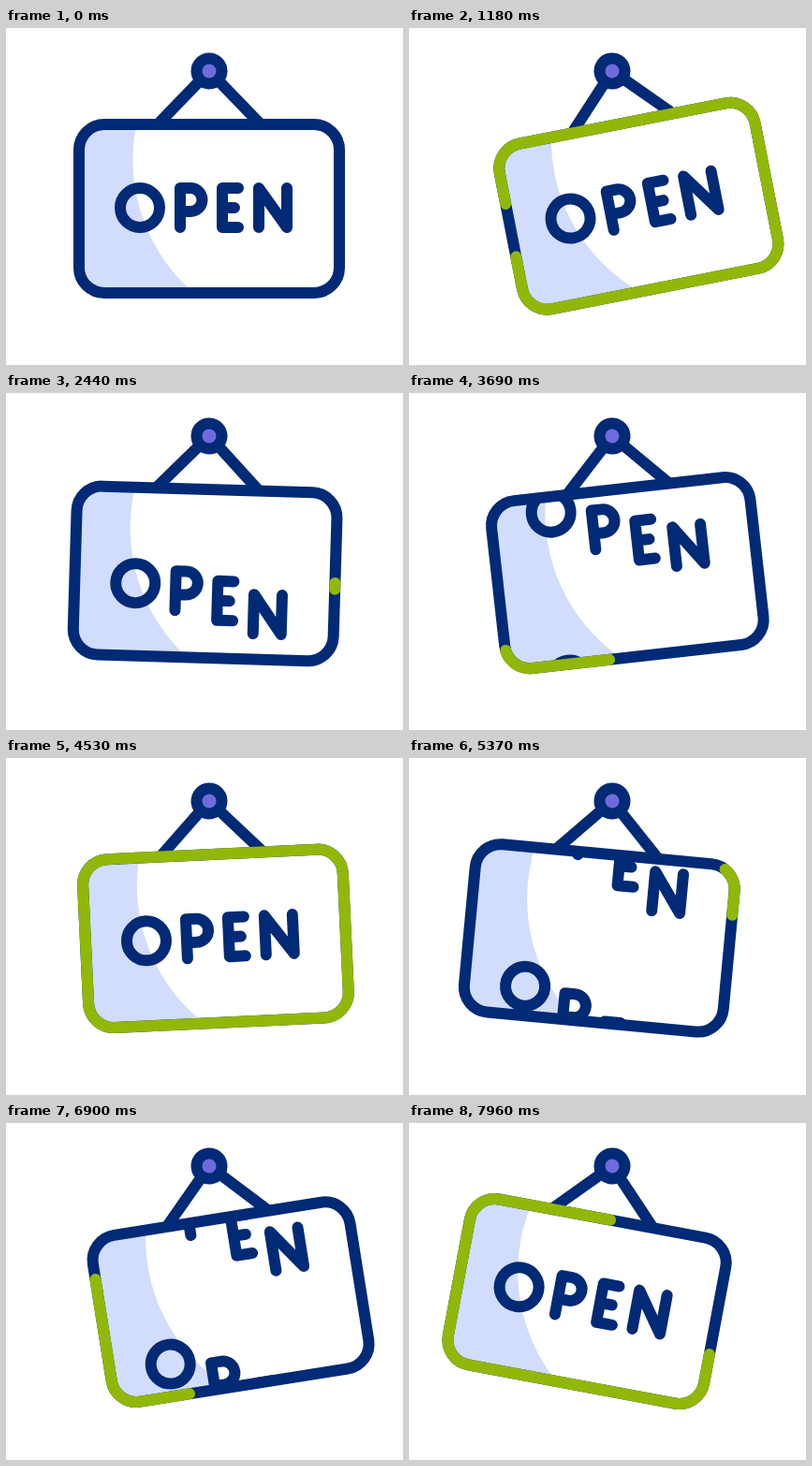
These frames come from a looping animation (424 px wide and 360 px high, 8 s). An HTML page:

```html
<!DOCTYPE html>
<html lang="en">
<head>
<meta charset="utf-8">
<title>Open sign</title>
<style>
  html, body { margin: 0; width: 100%; height: 100%; overflow: hidden; background: #fff; }
  svg { display: block; width: 424px; height: 360px; }
  .line { fill: none; stroke: #002a75; stroke-width: 12; stroke-linecap: round; stroke-linejoin: round; }
  #trace { stroke: #91b808; }
</style>
</head>
<body>
<svg viewBox="0 0 424 360" role="img" aria-label="OPEN">
  <defs>
    <path id="board" d="M356 193V256a27 27 0 0 1-27 27H105a27 27 0 0 1-27-27V130a27 27 0 0 1 27-27H329a27 27 0 0 1 27 27z"/>
    <clipPath id="inside"><use href="#board"/></clipPath>
  </defs>
  <g id="sign">
    <path class="line" d="M162 103L217 46L272 103"/>
    <g clip-path="url(#inside)">
      <use href="#board" fill="#d2dcfd"/>
      <circle cx="323" cy="141" r="187.5" fill="#fff"/>
      <g id="letters" class="line"></g>
    </g>
    <use href="#board" class="line"/>
    <path id="trace" class="line" pathLength="1"/>
    <circle class="line" cx="217" cy="46" r="13.5" style="fill:#6f6bdb"/>
  </g>
</svg>
<script>
const LOOP = 8000, CYCLE = 3130;
const FIRST_STEP = 130, STEP = 69.85;   // the motion is held in short steps
const PIN = '217 46';
const LETTERS = [
  'M164 192a21 21 0 1 1-42 0a21 21 0 1 1 42 0',
  'M186 213V171H197a12.5 12.5 0 0 1 0 25H186',
  'M248 171H231V213H248M231 192H244',
  'M270 213V171L300 213V171'
];
const ROLLS = [
  { start: 140, duration: 900, delay: 45, exit: 180 },
  { start: 1619, duration: 1117, delay: 50, exit: 200 }
];
const ENTRY = 180;

const $ = id => document.getElementById(id);
const clamp = x => Math.min(1, Math.max(0, x));
const mix = (a, b, k) => a + (b - a) * k;

// Cubic easing with flat ends: control points (x1, 0) and (x2, 1).
const ease = (x1, x2) => x => {
  if (x <= 0 || x >= 1) return clamp(x);
  let low = 0, high = 1, s;
  for (let i = 0; i < 24; i++) {
    s = (low + high) / 2;
    const at = 3 * s * (1 - s) * ((1 - s) * x1 + s * x2) + s ** 3;
    if (at < x) low = s; else high = s;
  }
  return s * s * (3 - 2 * s);
};
const linear = x => x;
const smooth = ease(1 / 3, 2 / 3);
const swing = ease(.6, .3);
const settle = ease(.4, .1);
const roll = ease(.7, .3);

// Each key is [time, value, easing towards this value].
function track(t, keys) {
  let [from, value] = keys[0];
  for (const [time, next, easing = linear] of keys.slice(1)) {
    if (t < time) return mix(value, next, easing(clamp((t - from) / (time - from))));
    [from, value] = [time, next];
  }
  return value;
}

const ANGLE = [[150, 0], [1020, -12, swing], [1920, 12, swing], [2880, 0, settle]];
const TURN = [[130, .105], [560, .283], [1180, .535], [1700, .763], [2240, .957], [2440, 1.016], [2560, 1.05]];
const HEAD = [[327, 0], [1336, 1, smooth]];
const TAIL = [[1340, 0], [2560, 1, ease(.4, .3)]];

function addLetter(d) {
  const path = document.createElementNS('http://www.w3.org/2000/svg', 'path');
  path.setAttribute('d', d);
  return $('letters').appendChild(path);
}
const pairs = LETTERS.map(d => [addLetter(d), addLetter(d)]);
const shift = (el, y) => el.setAttribute('transform', `translate(0 ${y})`);
$('trace').setAttribute('d', $('board').getAttribute('d'));

function draw(t) {
  $('sign').setAttribute('transform', `rotate(${track(t, ANGLE)} ${PIN})`);

  const tail = track(t, TAIL), length = track(t, HEAD) - tail;
  const trace = $('trace').style;
  trace.display = length > .0005 ? '' : 'none';
  trace.strokeDasharray = `${length} ${1 - length}`;
  trace.strokeDashoffset = -((track(t, TURN) + tail) % 1);

  const { start, duration, delay, exit } = ROLLS[t < 1400 ? 0 : 1];
  pairs.forEach(([leaving, entering], i) => {
    const k = roll(clamp((t - start - i * delay) / duration));
    shift(leaving, -exit * k);
    shift(entering, ENTRY * (1 - k));
  });
}

function frame() {
  const t = performance.now() % LOOP;
  const held = FIRST_STEP + Math.floor((t - FIRST_STEP) / STEP + .2) * STEP;
  draw(Math.max(0, held) % CYCLE);
  requestAnimationFrame(frame);
}
frame();
</script>
</body>
</html>
```
